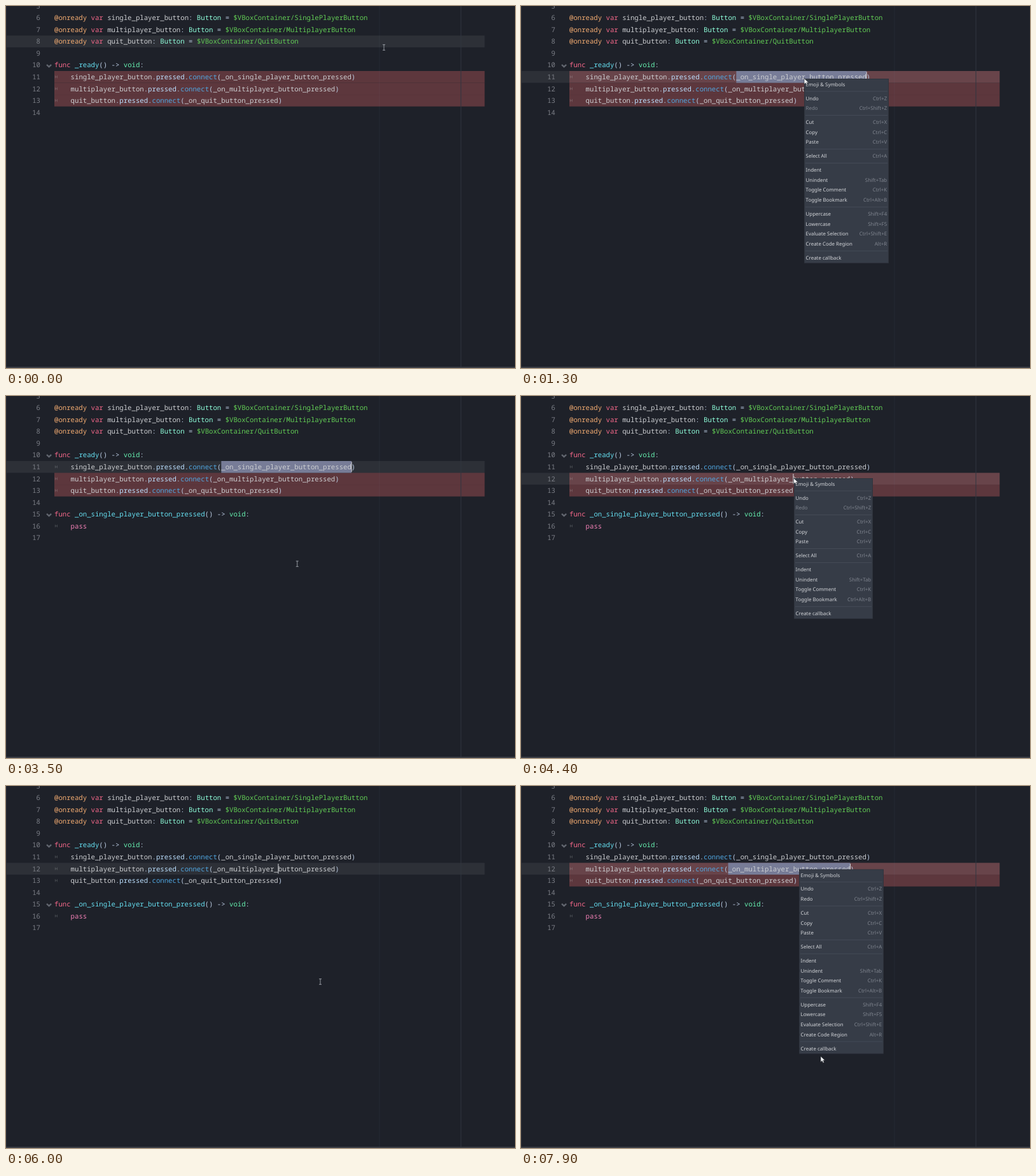
These frames come from a looping animation (800 px wide and 568 px high, 8000 ms). An HTML page:

```html
<!DOCTYPE html>
<html lang="en">
<head>
<meta charset="utf-8">
<title>Script editor</title>
<style>
  html, body { margin: 0; width: 100%; height: 100%; overflow: hidden; background: #1e2129; }
  svg { display: block; width: 800px; height: 568px; }
  text { white-space: pre; text-rendering: geometricPrecision; }
  .code, .num { font: 10.665px "Noto Sans Mono", "DejaVu Sans Mono", monospace; }
  .code { fill: #cdcfd2; }
  .num { fill: #7b7e86; text-anchor: end; }
  .item { font: 7.9px "Noto Sans", "Open Sans", sans-serif; fill: #d3d5d9; }
  .key { text-anchor: end; }
  .item.dim { fill: #7f848e; }
</style>
</head>
<body>
<svg id="stage" viewBox="0 0 800 568"></svg>
<script>
const LOOP = 8000, STEP = 100;
const LEFT = 76, RIGHT = 752.3, CHAR = 6.399, PITCH = 18.54;
const stage = document.getElementById('stage');

const lines = {
  5: '',
  6: '@onready var single_player_button: Button = $VBoxContainer/SinglePlayerButton',
  7: '@onready var multiplayer_button: Button = $VBoxContainer/MultiplayerButton',
  8: '@onready var quit_button: Button = $VBoxContainer/QuitButton',
  9: '',
  10: 'func _ready() -> void:',
  11: '\tsingle_player_button.pressed.connect(_on_single_player_button_pressed)',
  12: '\tmultiplayer_button.pressed.connect(_on_multiplayer_button_pressed)',
  13: '\tquit_button.pressed.connect(_on_quit_button_pressed)',
  14: '',
  15: 'func _on_single_player_button_pressed() -> void:',
  16: '\tpass',
  17: '',
  18: 'func () -> void:',
  19: '\tpass',
  20: ''
};

// Each colour belongs to the capture group at the same position.
const tokens = /(@\w+)|(\$[\w\/]+)|\b(var|func)\b|\b(pass)\b|\b(void)\b|\b(Button)\b|\b(connect)\b|((?<=func )\w+)|((?<=\.)pressed)|([^\w\s])/g;
const colors = ['#f5ad72', '#62cc55', '#f5688a', '#f280b6', '#66f0b0', '#8fffdb', '#50a6e0', '#66e0f2', '#bce0ff', '#bccde4'];

// The sixth section appears only when text is selected.
const sections = [
  [['Emoji & Symbols', '']],
  [['Undo', 'Ctrl+Z'], ['Redo', 'Ctrl+Shift+Z']],
  [['Cut', 'Ctrl+X'], ['Copy', 'Ctrl+C'], ['Paste', 'Ctrl+V']],
  [['Select All', 'Ctrl+A']],
  [['Indent', ''], ['Unindent', 'Shift+Tab'], ['Toggle Comment', 'Ctrl+K'], ['Toggle Bookmark', 'Ctrl+Alt+B']],
  [['Uppercase', 'Shift+F4'], ['Lowercase', 'Shift+F5'], ['Evaluate Selection', 'Ctrl+Shift+E'], ['Create Code Region', 'Alt+R']],
  [['Create callback', '']]
];

const menus = [
  { from: 1100, to: 3000, x: 445, y: 114, w: 133, full: true },
  { from: 4200, to: 5200, x: 429, y: 129, w: 124 },
  { from: 7200, to: 8000, x: 437, y: 130.8, w: 133, full: true, redo: true }
];

// Mouse stops: time, x, y
const path = [
  [0, 594, 65], [100, 594, 65], [600, 445, 113.5], [1400, 445, 113.5],
  [2300, 487, 398], [3100, 487, 398], [3900, 428.5, 128.7], [4500, 428.5, 128.7],
  [5000, 460, 346], [5300, 460, 346], [5800, 494, 307], [6100, 494, 307],
  [6600, 437, 130], [7300, 437, 130], [7800, 471, 424], [8000, 471, 424]
];

const within = (t, a, b) => t >= a && t < b;
const esc = s => s.replace(/&/g, '&amp;').replace(/</g, '&lt;').replace(/>/g, '&gt;');
const rowTop = n => 102 + (n - 11) * PITCH;
const colX = c => LEFT + c * CHAR;
const rect = (x, y, w, h, fill, extra = '') =>
  `<rect x="${x}" y="${y}" width="${w}" height="${h}" fill="${fill}" ${extra}/>`;
const label = (x, y, cls, body) => `<text x="${x}" y="${y}" class="${cls}">${body}</text>`;
const stroke = (d, color, width) =>
  `<path d="${d}" fill="none" stroke="${color}" stroke-width="${width}"/>`;

function mouseAt(t) {
  const i = path.findIndex((p, k) => k && t <= p[0]);
  const [t0, x0, y0] = path[i - 1], [t1, x1, y1] = path[i];
  const u = (t - t0) / (t1 - t0), e = u * u * (3 - 2 * u);
  return { x: x0 + (x1 - x0) * e, y: y0 + (y1 - y0) * e };
}

function paint(src) {
  let out = '', last = 0;
  for (const m of src.matchAll(tokens)) {
    const kind = m.slice(1).findIndex(g => g !== undefined);
    out += esc(src.slice(last, m.index)) + `<tspan fill="${colors[kind]}">${esc(m[0])}</tspan>`;
    last = m.index + m[0].length;
  }
  return out + esc(src.slice(last));
}

function codeLine(n) {
  const y = rowTop(n), src = lines[n], tab = src[0] === '\t';
  let out = label(54, y + 13, 'num', n);
  if (tab) out += stroke(`M77.4 ${y + 7}v4.4M80.4 ${y + 7}v4.4M77.4 ${y + 9.2}h3`, 'rgba(205,207,210,.25)', 0.8);
  if (src.startsWith('func')) out += stroke(`M64 ${y + 8.7}l3.6 3.3l3.6 -3.3`, '#62666f', 2.3);
  return out + label(colX(tab ? 4 : 0), y + 13, 'code', paint(src.trimStart()));
}

function errorLines(t) {
  if (t < 3500) return [11, 12, 13];
  if (t < 5600) return [12, 13];
  if (t < 5900) return [18];
  return t < 6400 ? [] : [12, 13];
}

function selection(t) {
  if (within(t, 800, 4000)) return { row: 11, from: 41, len: 32 };
  if (t >= 6800) return { row: 12, from: 39, len: 30 };
}

function caretAt(t, sel) {
  if (sel) return { row: sel.row, col: sel.from + sel.len };
  if (t < 700) return { row: 8 };
  if (t < 800) return { row: 11, col: 58 };
  if (t < 4200) return { row: 11, col: 73 };
  return { row: 12, col: 55 };
}

function drawMenu(menu, mouse) {
  const shown = sections.filter((s, i) => menu.full || i !== 5);
  const right = menu.x + menu.w;
  const height = shown.flat().length * 15.7 + (shown.length - 1) * 6.1 + 1.6;
  let y = menu.y + 1.2;
  let out = rect(menu.x, menu.y, menu.w, height, '#363c47');
  shown.forEach((items, s) => {
    if (s) {
      out += rect(menu.x + 2, y + 2.6, menu.w - 4, 0.8, '#484e5a');
      y += 6.1;
    }
    for (const [name, key] of items) {
      const hot = mouse.x > menu.x && mouse.x < right && within(mouse.y, y, y + 15.7);
      if (hot) out += rect(menu.x, y, menu.w, 15.7, '#4c515b');
      const dim = name === 'Redo' && !menu.redo ? ' dim' : '';
      out += label(menu.x + 2.6, y + 10.5, 'item' + dim, esc(name));
      out += label(right - 2.8, y + 10.5, 'item key dim', key);
      y += 15.7;
    }
  });
  return out + rect(menu.x + 0.25, menu.y + 0.25, menu.w - 0.5, height - 0.5, 'none', 'stroke="#282c35" stroke-width=".5"');
}

function drawMouse({ x, y }, arrow) {
  const d = arrow ? 'M0 0V9.2L2.2 7.2L3.8 10.4L5.4 9.6L3.9 6.6H6.8Z' : 'M-2 -4.3H2M0 -4.3V4.3M-2 4.3H2';
  const look = arrow ? 'fill="#f2f3f5" stroke="#23262d" stroke-width=".6"' : 'fill="none" stroke="#a0a4ab" stroke-width=".9"';
  return `<path d="${d}" transform="translate(${x} ${y})" ${look}/>`;
}

function draw(t) {
  const sel = selection(t), caret = caretAt(t, sel), mouse = mouseAt(t);
  const menu = menus.find(m => within(t, m.from, m.to));
  const lastLine = t < 3000 ? 14 : within(t, 5200, 5900) ? 20 : 17;
  let out = rect(0, 0, 800, 568, '#1e2129');

  for (const n of errorLines(t)) out += rect(LEFT, rowTop(n), RIGHT - LEFT, PITCH, '#5d373d');
  out += rect(0, rowTop(caret.row), RIGHT, PITCH, '#fff', 'fill-opacity=".065"');
  out += rect(586.5, 0, 1, 568, '#8f9bb5', 'fill-opacity=".08"');
  out += rect(714.5, 0, 1, 568, '#313641');
  if (sel) out += rect(colX(sel.from), rowTop(sel.row), sel.len * CHAR, PITCH, '#777c97');

  for (let n = 5; n <= lastLine; n++) out += codeLine(n);
  if (caret.col) out += rect(colX(caret.col) - 0.5, rowTop(caret.row) + 1.5, 1, 15.5, '#d8dade');

  out += rect(0, 0, 1, 568, '#2b2e37') + rect(0, 566, 800, 2, '#3b3e46');
  if (menu) out += drawMenu(menu, mouse);
  stage.innerHTML = out + drawMouse(mouse, menu);
}

let shownAt = -1;
function tick() {
  const t = Math.floor((performance.now() % LOOP) / STEP) * STEP;
  if (t !== shownAt) draw(shownAt = t);
  requestAnimationFrame(tick);
}
tick();
</script>
</body>
</html>
```
